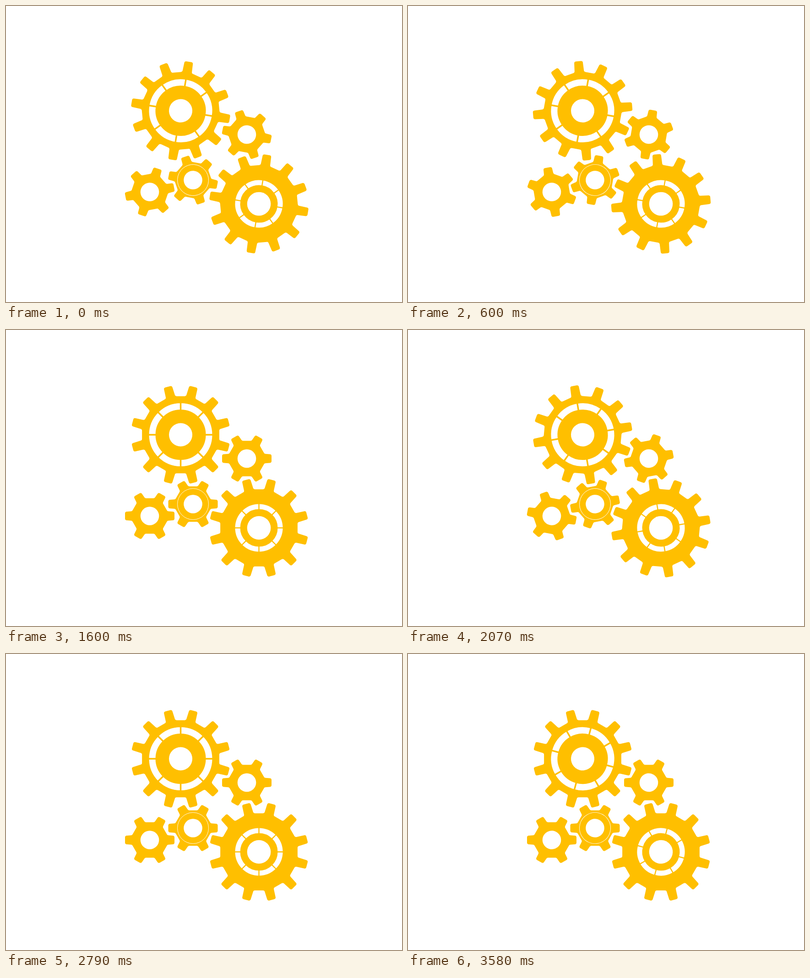
These frames come from a looping animation (865 by 647 pixels, 3.66 s). An HTML page with a canvas:

```html
<!DOCTYPE html>
<html lang="en">
<head>
<meta charset="utf-8">
<title>Gears</title>
<style>
  html, body { margin: 0; width: 100%; height: 100%; overflow: hidden; background: #fff; }
  canvas { display: block; }
</style>
</head>
<body>
<canvas id="stage" width="865" height="647"></canvas>
<script>
const ctx = document.getElementById('stage').getContext('2d');
const LOOP = 3660, TAU = Math.PI * 2, GOLD = '#ffbf00', WHITE = '#fff';

// Evenly spaced picture changes: [first, last, count]
const steps = [[0, 0, 1], [120, 600, 7], [660, 1130, 7], [1190, 1600, 6], [1660, 1660, 1],
  [1750, 2230, 7], [2280, 2790, 7], [2860, 3320, 7], [3420, 3580, 3]]
  .flatMap(([a, b, n]) => Array.from({ length: n }, (_, i) => a + (b - a) * i / Math.max(1, n - 1)));

// Rotation of the large gears: [time, degrees]
const turns = [[0, 9.5], [600, 55.1], [1130, 98.4], [1600, 135], [2070, 170.3], [2790, 225], [3580, 285]];

const large = { teeth: 12, body: 85.2, tip: 108.6, speed: 1 };
const small = { teeth: 6, body: 40, tip: 54, hole: 20.3 };
const gears = [
  { ...large, x: 381.5, y: 229, hole: 25.5, ring: [55, 69], spoke: 3.5 },
  { ...large, x: 552.5, y: 432.5, hole: 25.8, ring: [41, 52], spoke: 2.4 },
  { ...small, x: 526, y: 281, speed: -2 },
  { ...small, x: 408.5, y: 380.5, speed: -2, line: 34 },
  { ...small, x: 314, y: 406.5, speed: 2 }
];

function outline({ teeth, body, tip }) {
  const points = [];
  for (let i = 0; i < teeth; i++) {
    const a = i * TAU / teeth, c = Math.cos(a), s = Math.sin(a);
    for (const [r, half] of [[body, -10.4], [tip, -9.3], [tip, 9.3], [body, 10.4]]) {
      const h = r === body ? Math.sqrt(r * r - half * half) : r;
      points.push([half * c + h * s, half * s - h * c]);
    }
  }
  const path = new Path2D(), [last, first] = [points.at(-1), points[0]];
  path.moveTo((last[0] + first[0]) / 2, (last[1] + first[1]) / 2);
  points.forEach((p, i) => path.arcTo(...p, ...points[(i + 1) % points.length], 4));
  path.closePath();
  return path;
}
gears.forEach(g => g.path = outline(g));

function circle(r, width) {
  ctx.beginPath();
  ctx.arc(0, 0, r, 0, TAU);
  ctx.lineWidth = width || 0;
  width ? ctx.stroke() : ctx.fill();
}

function drawGear(g, angle) {
  ctx.save();
  ctx.translate(g.x, g.y);
  ctx.rotate(angle * g.speed);
  ctx.fillStyle = GOLD;
  ctx.fill(g.path);
  ctx.fillStyle = ctx.strokeStyle = WHITE;
  circle(g.hole);
  if (g.line) circle(g.line, 0.9);
  if (g.ring) {
    const [inner, outer] = g.ring;
    circle((inner + outer) / 2, outer - inner);
    ctx.fillStyle = GOLD;
    for (let i = 0; i < 8; i++) {
      ctx.fillRect(-g.spoke / 2, inner - 1, g.spoke, outer - inner + 2);
      ctx.rotate(TAU / 8);
    }
  }
  ctx.restore();
}

function turnAt(t) {
  const i = Math.max(1, turns.findIndex(([time]) => time >= t));
  const [t0, a0] = turns[i - 1], [t1, a1] = turns[i];
  return a0 + (a1 - a0) * (t - t0) / (t1 - t0);
}

function draw(now) {
  const t = now % LOOP;
  const angle = turnAt(steps.findLast(s => s <= t)) * TAU / 360;
  ctx.fillStyle = WHITE;
  ctx.fillRect(0, 0, 865, 647);
  gears.forEach(g => drawGear(g, angle));
}

const start = performance.now();
function tick() {
  draw(performance.now() - start);
  requestAnimationFrame(tick);
}
tick();
</script>
</body>
</html>
```
